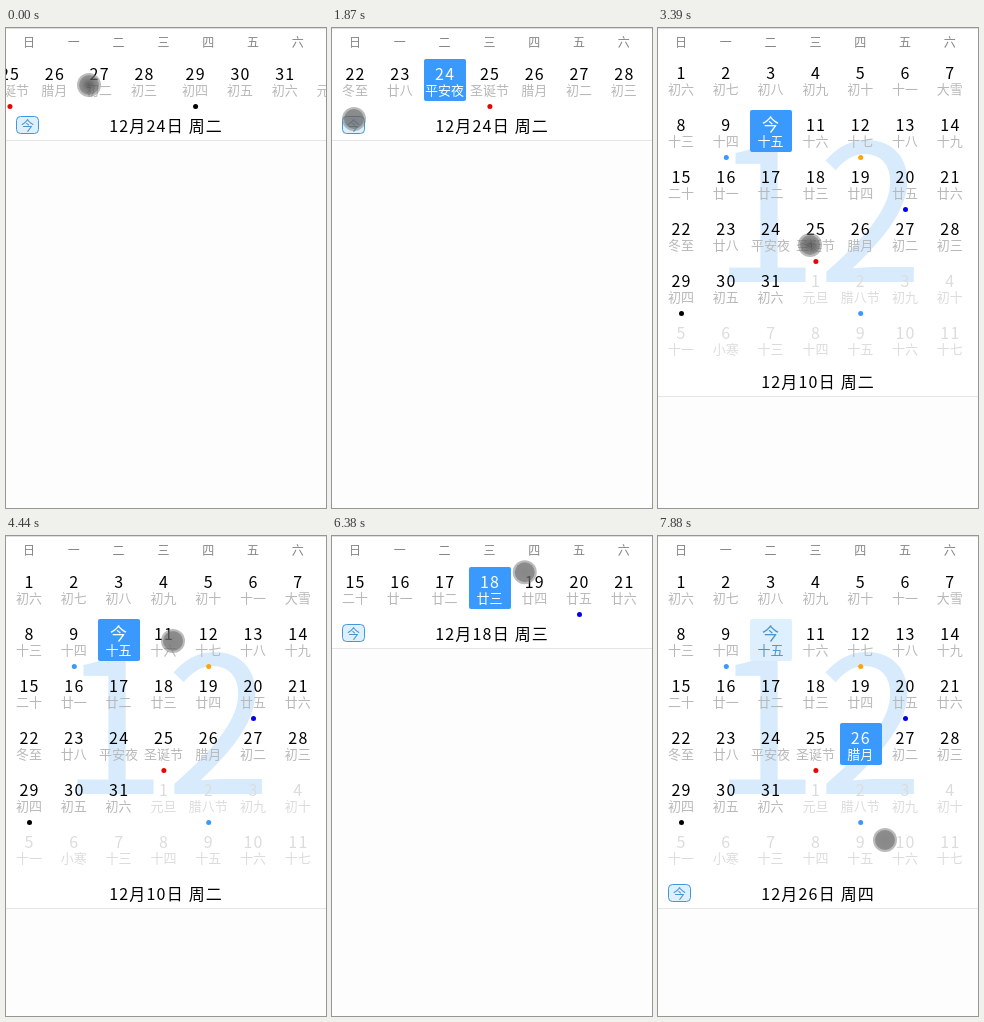
Recreate the animation shown at these times as an HTML page with a canvas. Size 320x480 px, loop 8000 ms.

```html
<!DOCTYPE html>
<html lang="zh">
<head>
<meta charset="utf-8">
<title>Calendar</title>
<style>
  html, body { margin: 0; width: 100%; height: 100%; overflow: hidden; background: #fff; }
  canvas { display: block; width: 320px; height: 480px; }
</style>
</head>
<body>
<canvas id="stage" width="320" height="480"></canvas>
<script>
const ctx = document.getElementById('stage').getContext('2d');
const LOOP = 8000, STEP = 150, ROW = 52, CLOSED = 112, OPEN = 372, TODAY = 10;
const FONT = '"Noto Sans CJK SC", "Noto Sans CJK", "Noto Sans", sans-serif';
const BLUE = '#3999fc', PALE = '#def0fd', INK = '#4a94cf';
const WEEK = [...'日一二三四五六'];
const LUNAR = ('初六 初七 初八 初九 初十 十一 大雪 十三 十四 十五 十六 十七 十八 十九 ' +
  '二十 廿一 廿二 廿三 廿四 廿五 廿六 冬至 廿八 平安夜 圣诞节 腊月 初二 初三 ' +
  '初四 初五 初六 元旦 腊八节 初九 初十 十一 小寒 十三 十四 十五 十六 十七').split(' ');
const DOTS = { 9: BLUE, 12: '#ffa500', 20: '#0000f0', 25: '#f00000', 29: '#000', 33: BLUE };

// Key points of the finger: [time, x, y]
const FINGER = [[0, 83, 57], [400, 45, 58], [920, 260, 57], [1580, 22, 91], [2240, 22, 91],
  [2950, 140, 50], [3230, 148, 110], [3380, 152, 217], [4430, 167, 105], [4730, 167, 105],
  [5180, 160, 158], [5540, 178, 188], [5930, 186, 37], [6530, 195, 36], [6830, 209, 287],
  [7430, 207, 212], [7580, 207, 212], [7880, 227, 304]];
// Taps and page turns: [time, selected day]
const PICKS = [[0, 24], [380, 31], [980, 24], [2240, 10], [4580, 11], [5180, 18], [7430, 26]];

const colX = c => 23 + 44.8 * c;
const ramp = (t, a, b) => Math.min(1, Math.max(0, (t - a) / (b - a)));
const ease = (t, a, b) => (1 - Math.cos(Math.PI * ramp(t, a, b))) / 2;

// The screen refreshes every STEP ms
const snap = t => Math.max(0, Math.floor((t - 80) / STEP) * STEP + 80);

// Week shown in the strip: finish a swipe, swipe back, jump to today, follow the tapped day
const pageAt = t => 3.481 + 0.519 * ramp(t, 0, 380) - ease(t, 560, 1180)
  - 2 * ease(t, 2150, 2680) + ramp(t, 5050, 5180);

// Share of the month pulled open
const openAt = t => ramp(t, 3094, 3385) - ramp(t, 5548, 6220) + ramp(t, 6545, 6852);

function fingerAt(t) {
  const i = FINGER.findIndex(k => k[0] > t);
  if (i < 0) return FINGER.at(-1).slice(1);
  const [t0, x0, y0] = FINGER[i - 1], [t1, x1, y1] = FINGER[i];
  const k = ramp(t, t0, t1);
  return [x0 + (x1 - x0) * k, y0 + (y1 - y0) * k];
}

function text(str, x, y, size, color, weight = 400, spacing = 0) {
  ctx.font = `${weight} ${size}px ${FONT}`;
  ctx.letterSpacing = spacing + 'px';
  ctx.fillStyle = color;
  ctx.fillText(str, x + spacing / 2, y);
}

function box(x, y, w, h, r, fill, stroke) {
  ctx.beginPath();
  ctx.roundRect(x, y, w, h, r);
  ctx.fillStyle = fill;
  ctx.fill();
  if (stroke) {
    ctx.strokeStyle = stroke;
    ctx.lineWidth = 1;
    ctx.stroke();
  }
}

function disc(x, y, r, fill) {
  ctx.beginPath();
  ctx.arc(x, y, r, 0, Math.PI * 2);
  ctx.fillStyle = fill;
  ctx.fill();
}

function drawDay(day, x, top, selected, muted) {
  const active = day === selected, today = day === TODAY;
  let main = muted ? '#dcdcdc' : '#000', sub = muted ? '#dcdcdc' : '#b8b8b8';
  if (active) main = sub = '#fff';
  else if (today) main = sub = INK;
  if (active || today) box(Math.ceil(x - 21), top, 42, 42, 2, active ? BLUE : PALE);
  const heavy = active || muted;
  if (today) text('今', x, top + 21, 17, main, active ? 500 : 400);
  else text(String(day > 31 ? day - 31 : day), x, top + 21, 16, main, heavy ? 500 : 350, 1.2);
  text(LUNAR[day - 1], x, top + 36, 13, sub, heavy ? 500 : 400);
  if (DOTS[day]) disc(x + 0.5, top + 47.5, 2.5, DOTS[day]);
}

function drawRow(row, dx, top, selected, muteNext) {
  for (let c = 0; c < 7; c++) {
    const day = row * 7 + c + 1;
    drawDay(day, colX(c) + dx, top, selected, muteNext && day > 31);
  }
}

function drawGrid(page, open, height, selected) {
  ctx.save();
  ctx.beginPath();
  ctx.rect(0, 30, 320, height - 60);
  ctx.clip();
  if (open === 0) {
    const first = Math.floor(page);
    for (const row of [first, first + 1]) drawRow(row, (row - page) * 320, 31, selected, false);
  } else {
    text('12', 160, 258 - 240 * (1 - open), 190, `rgba(57,153,245,${0.2 * open})`, 350);
    const shift = -Math.floor((selected - 1) / 7) * ROW * (1 - open);
    for (let r = 0; r < 6; r++) drawRow(r, 0, Math.round(31 + r * ROW + shift), selected, open > 0.8);
  }
  ctx.restore();
}

function drawFooter(height, selected) {
  const day = WEEK[(selected - 1) % 7];
  text(`12月${selected}日 周${day}`, 159.5, height - 8, 16, '#000', 350, 1.2);
  if (selected !== TODAY) {
    box(10.5, height - 23.5, 22, 17, 4, PALE, '#3d98dc');
    text('今', 21.5, height - 10, 13, INK);
  }
  ctx.fillStyle = '#e6e6e6';
  ctx.fillRect(0, height, 320, 1);
}

function drawFinger(x, y, dark) {
  disc(x, y, 12, 'rgba(120,120,120,.5)');
  const core = ctx.createRadialGradient(x, y, 2, x, y, 10.5);
  core.addColorStop(0, dark ? 'rgba(50,50,50,.6)' : 'rgba(95,95,95,.55)');
  core.addColorStop(1, dark ? 'rgba(95,95,95,.4)' : 'rgba(95,95,95,.5)');
  disc(x, y, 10, core);
}

function draw(time) {
  const t = snap(time);
  const open = openAt(t);
  const height = Math.round(CLOSED + (OPEN - CLOSED) * open);
  const selected = PICKS.findLast(p => p[0] <= t)[1];
  const pressed = t < 1000 || (t > 3000 && t < 3500);

  ctx.fillStyle = '#fff';
  ctx.fillRect(0, 0, 320, 480);
  ctx.fillStyle = '#fdfdfd';
  ctx.fillRect(0, height, 320, 480 - height);
  ctx.fillStyle = '#dedede';
  ctx.fillRect(0, 0, 320, 1);
  ctx.textAlign = 'center';
  WEEK.forEach((name, c) => text(name, colX(c), 19, 12, '#858585'));
  drawGrid(pageAt(t), open, height, selected);
  drawFooter(height, selected);
  drawFinger(...fingerAt(t), pressed);
}

const origin = performance.now();
function tick() {
  draw((performance.now() - origin) % LOOP);
  requestAnimationFrame(tick);
}
tick();
</script>
</body>
</html>
```
